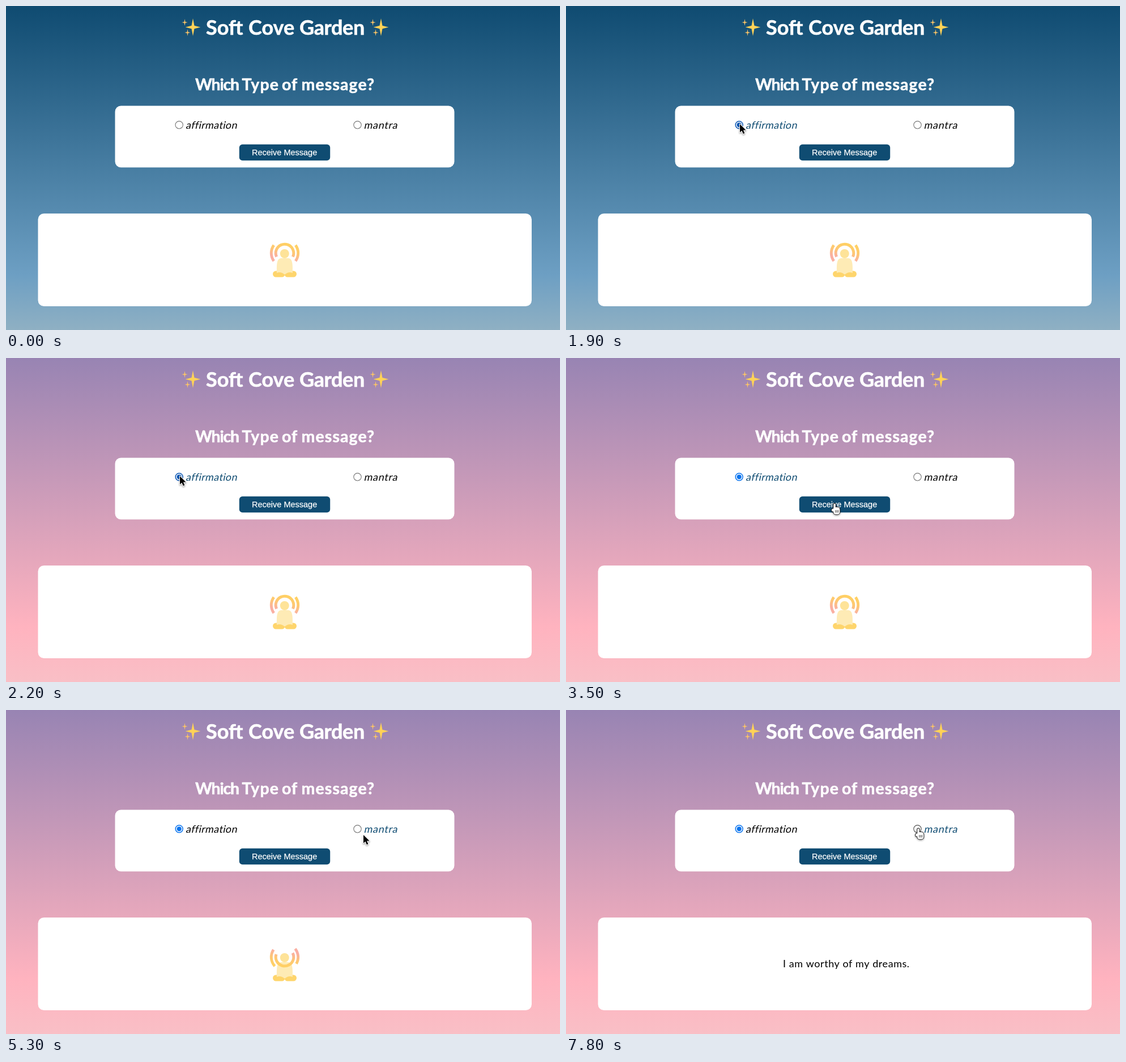
An HTML page with a canvas for the animation above (8 s loop, 978 by 573 pixels).

```html
<!DOCTYPE html>
<html lang="en">
<head>
<meta charset="utf-8">
<title>Message picker</title>
<style>
html, body { margin: 0; width: 100%; height: 100%; overflow: hidden; }
canvas { display: block; width: 978px; height: 573px; }
</style>
</head>
<body>
<canvas id="stage" width="978" height="573"></canvas>
<script>
const W = 978, H = 573, LOOP = 8000, STEP = 100;
const ctx = document.getElementById('stage').getContext('2d');
const NAVY = '#0f4c72', SANS = 'Lato, sans-serif';

const SKIES = {
  blue: ['#0f4b71', '#6d9fc3', '#8fb0c3'],
  mauve: ['#7376a5', '#c49aae', '#c5a9b9'],
  dusk: ['#9884b3', '#ffb3bf', '#f9bfc6']
};

// The cursor rests between moves.
const ENTRY = { x: 498, y: 461 };
const MOVES = [
  { from: 300, to: 500, x: 286, y: 272 },
  { from: 700, to: 900, x: 306, y: 224 },
  { from: 1100, to: 1300, x: 307, y: 209 },
  { from: 2800, to: 3300, x: 474, y: 257 },
  { from: 3500, to: 3700, x: 664, y: 225 },
  { from: 3800, to: 4500, x: 625, y: 211 },
  { from: 4800, to: 5100, x: 631, y: 221 },
  { from: 7000, to: 7300, x: 622, y: 209 }
];

const ramp = (t, a, b) => Math.max(0, Math.min(1, (t - a) / (b - a)));
const ease = k => k * k * (3 - 2 * k);
const mix = (a, b, k) => a + (b - a) * k;
const within = (t, a, b) => t >= a && t < b;

function box(x, y, w, h, r, fill) {
  ctx.fillStyle = fill;
  ctx.beginPath();
  ctx.roundRect(x, y, w, h, r);
  ctx.fill();
}

function disc(x, y, r, fill) {
  ctx.fillStyle = fill;
  ctx.beginPath();
  ctx.arc(x, y, r, 0, 7);
  ctx.fill();
}

function text(str, x, y, { font, fill = '#fff', track = 0, slant = 0, weight = 0 }) {
  ctx.save();
  ctx.translate(x, y);
  ctx.transform(1, 0, -slant, 1, 0, 0);
  ctx.font = font;
  ctx.letterSpacing = track + 'px';
  ctx.fillStyle = ctx.strokeStyle = fill;
  ctx.fillText(str, 0, 0);
  if (weight) {
    // A thin round outline softens the letter corners.
    ctx.lineWidth = weight;
    ctx.lineJoin = 'round';
    ctx.strokeText(str, 0, 0);
  }
  ctx.restore();
}

function sky(t) {
  const [top, low, end] = SKIES[t < 2100 ? 'blue' : t < 2200 ? 'mauve' : 'dusk'];
  const g = ctx.createLinearGradient(0, 0, 0, H);
  g.addColorStop(0, top);
  g.addColorStop(0.83, low);
  g.addColorStop(1, end);
  ctx.fillStyle = g;
  ctx.fillRect(0, 0, W, H);
}

function star(x, y, r, fill) {
  ctx.fillStyle = fill;
  ctx.beginPath();
  for (let i = 0; i <= 8; i++) {
    const a = i * Math.PI / 4, d = i % 2 ? r * 0.26 : r;
    ctx.lineTo(x + Math.sin(a) * d * 0.86, y - Math.cos(a) * d);
  }
  ctx.fill();
}

function sparkles(x) {
  star(x + 19, 37.5, 15.5, '#ffd257');
  star(x + 4.5, 29, 6, '#fbc466');
  star(x + 9.5, 47, 6, '#fbc466');
}

function header() {
  const title = { font: '700 36px ' + SANS, weight: 0.6 };
  const sub = { font: '700 28.5px ' + SANS, weight: 0.6, track: 1.1 };
  sparkles(311);
  sparkles(643);
  text('Soft', 353, 50.5, title);
  text('Cove', 428, 50.5, title);
  text('Garden', 518, 50.5, { ...title, track: -0.4 });
  text('Which', 334, 149, { ...sub, track: -1.2 });
  text('Type', 416.5, 149, sub);
  text('of', 487, 149, sub);
  text('message?', 521.5, 149, sub);
}

function radio(x, on, ring) {
  disc(x, 210.3, 7.2, ring);
  disc(x, 210.3, on ? 5.7 : 6.1, '#fff');
  if (on) disc(x, 210.3, 4.1, ring);
}

function form(t) {
  const label = { font: '18px ' + SANS, track: 0.35, slant: 0.22 };
  const on = t >= 1900, pressed = on && t < 3100;
  box(192.5, 176.5, 599, 109, 10.5, '#fff');

  radio(305.7, on, !on ? '#767676' : pressed ? '#0b57b4' : '#0a74ee');
  text('affirmation', 317, 217, { ...label, fill: on && t < 3600 ? NAVY : '#000' });

  const hover = within(t, 4500, 5100) || t >= 7200;
  radio(620.5, false, hover ? '#4f4f4f' : '#767676');
  const blue = t >= 7200 ? 1 : t >= 4500 ? 1 - ramp(t, 5500, 6000) : 0;
  const fill = `rgb(${15 * blue},${76 * blue},${114 * blue})`;
  text('mantra', 631.5, 217, { ...label, fill, track: 0.7 });

  box(411.8, 244.8, 160.4, 28.4, 5.5, NAVY);
  text('Receive Message', 434, 263.7,
    { font: '14.5px "Liberation Sans", Arial, sans-serif', weight: 0.25 });
}

function arc(r, mid, half, width) {
  if (half < 0.01) return;
  ctx.lineWidth = width;
  ctx.beginPath();
  ctx.arc(492, 437, r, mid - half, mid + half);
  ctx.stroke();
}

// Three arcs turn together while their lengths breathe.
function rings(t) {
  const turn = Math.max(0, t - 3800) / 700;
  const spin = turn * 1.43, swell = Math.sin(turn * Math.PI / 2) ** 2;
  const tilt = spin + 0.25;
  const dx = Math.sin(tilt) * 20, dy = Math.cos(tilt) * 20;
  const g = ctx.createLinearGradient(492 + dx, 437 - dy, 492 - dx, 437 + dy);
  g.addColorStop(0.1, '#ffd064');
  g.addColorStop(0.4, '#fec873');
  g.addColorStop(0.75, '#faafa2');
  ctx.strokeStyle = g;
  arc(15.8, spin - Math.PI / 2, 2 - 0.57 * swell, 5);
  arc(23.7, spin, 0.63 + 0.7 * swell, 4.9);
  arc(23.7, spin + Math.PI, 0.63 * (1 - swell), 4.9);
}

function figure(t) {
  ctx.save();
  ctx.globalAlpha = 1 - ramp(t, 5800, 7100) ** 1.8;
  for (const x of [471, 491.5]) box(x, 468.5, 21.5, 11, 5.5, '#fed56c');
  ctx.fillStyle = '#feebb5';
  ctx.beginPath();
  ctx.moveTo(478, 472);
  ctx.bezierCurveTo(478, 460, 477, 446, 486, 446);
  ctx.lineTo(498, 446);
  ctx.bezierCurveTo(507, 446, 506, 460, 506, 472);
  ctx.quadraticCurveTo(499, 469, 492, 475);
  ctx.quadraticCurveTo(485, 469, 478, 472);
  ctx.fill();
  disc(491.8, 438, 8, '#fee398');
  rings(t);
  ctx.restore();
}

function message(t) {
  ctx.globalAlpha = ramp(t, 7000, 7500);
  text('I am worthy of my dreams.', 383, 455.3,
    { font: '18px ' + SANS, fill: '#000', track: 0.55 });
  ctx.globalAlpha = 1;
}

const ARROW = new Path2D('M0 0V14.5L3.4 11.5L5.8 17L8.4 15.9L6 10.5H10.6Z');
const HAND = new Path2D();
HAND.roundRect(-1.7, 0.5, 3.4, 13, 1.7);
HAND.roundRect(-1.7, 7, 11, 12.5, 4);
HAND.roundRect(-5, 9.5, 6, 5, 2.5);

function cursor(t) {
  if (t < 300) return;
  let { x, y } = ENTRY;
  for (const m of MOVES) {
    const k = ease(ramp(t, m.from, m.to));
    x = mix(x, m.x, k);
    y = mix(y, m.y, k);
  }
  const hand = within(t, 3200, 3600) || t >= 7300;
  const shape = hand ? HAND : ARROW;
  ctx.save();
  ctx.translate(x, y);
  ctx.lineJoin = 'round';
  ctx.lineWidth = 2;
  ctx.strokeStyle = hand ? '#222' : '#fff';
  ctx.fillStyle = hand ? '#fff' : '#000';
  ctx.shadowColor = 'rgba(0,0,0,.4)';
  ctx.shadowBlur = 3;
  ctx.shadowOffsetY = 1.5;
  ctx.stroke(shape);
  ctx.shadowColor = 'transparent';
  ctx.fill(shape);
  ctx.fillStyle = '#333';
  for (let i = 0; hand && i < 3; i++) ctx.fillRect(1.4 + i * 2.3, 12, 0.9, 4.5);
  ctx.restore();
}

function draw(t) {
  sky(t);
  header();
  form(t);
  box(56.5, 367, 871.5, 164, 10.5, '#fff');
  if (t < 7100) figure(t);
  else message(t);
  cursor(t);
}

const start = performance.now();
function tick() {
  const t = (performance.now() - start) % LOOP;
  draw(Math.floor(t / STEP) * STEP);
  requestAnimationFrame(tick);
}
tick();
</script>
</body>
</html>
```
